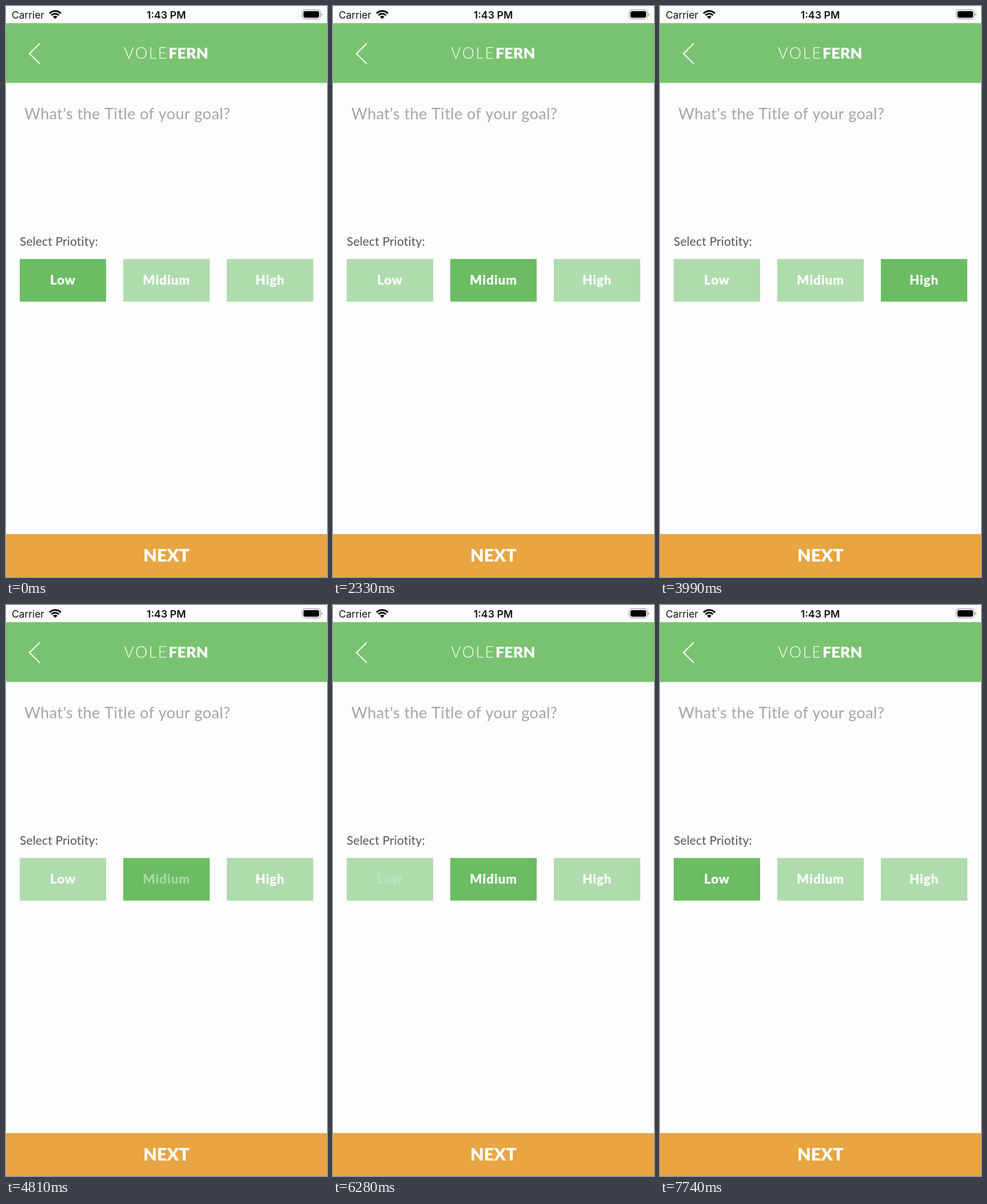
Write an HTML page with a canvas that moves like this. It is 561x998 px and loops after 7.84 s.

```html
<!DOCTYPE html>
<html lang="en">
<head>
<meta charset="utf-8">
<title>Goal form</title>
<style>
  html, body { margin: 0; width: 100%; height: 100%; overflow: hidden; background: #fdfdfc; }
  canvas { display: block; width: 561px; height: 998px; }
</style>
</head>
<body>
<canvas id="stage" width="561" height="998"></canvas>
<script>
const ctx = document.getElementById("stage").getContext("2d");
const LOOP = 7840;
const HOLD = 80;
const FADE = 1100;
const PRESSED_ALPHA = 0.2;

const buttons = [
  { label: "Low", x: 24 },
  { label: "Midium", x: 205 },
  { label: "High", x: 386 },
];
const taps = [
  { at: 980, button: 1 },
  { at: 2750, button: 2 },
  { at: 4440, button: 1 },
  { at: 6280, button: 0 },
];

function rect(x, y, w, h, color) {
  ctx.fillStyle = color;
  ctx.fillRect(x, y, w, h);
}

function text(str, x, y, font, color, { align = "left", spacing = 0 } = {}) {
  ctx.font = font;
  ctx.textAlign = align;
  ctx.letterSpacing = spacing + "px";
  ctx.fillStyle = color;
  ctx.fillText(str, x, y);
}

const lato = (weight, size) => `${weight} ${size}px Lato, sans-serif`;
const inter = (weight, size) => `${weight} ${size}px Inter, sans-serif`;

function drawWifi(x, y) {
  const up = -Math.PI / 2, spread = 0.8;
  ctx.strokeStyle = ctx.fillStyle = "#000";
  ctx.lineWidth = 3;
  for (const r of [13.8, 9]) {
    ctx.beginPath();
    ctx.arc(x, y, r, up - spread, up + spread);
    ctx.stroke();
  }
  ctx.beginPath();
  ctx.moveTo(x, y);
  ctx.arc(x, y, 5.5, up - spread, up + spread);
  ctx.fill();
}

function drawBattery() {
  ctx.strokeStyle = ctx.fillStyle = "#a0a0a0";
  ctx.lineWidth = 1.2;
  ctx.beginPath();
  ctx.roundRect(517.5, 6.7, 32, 16, 4.5);
  ctx.stroke();
  ctx.beginPath();
  ctx.arc(550.8, 14.7, 2.2, -Math.PI / 2, Math.PI / 2);
  ctx.fill();
  ctx.fillStyle = "#000";
  ctx.beginPath();
  ctx.roundRect(519.8, 9, 27.4, 11.4, 2.8);
  ctx.fill();
}

function drawStatusBar() {
  text("Carrier", 10, 21.5, inter(400, 17.4), "#111");
  drawWifi(86, 22.5);
  text("1:43 PM", 280, 21.5, inter(600, 17.8), "#111", { align: "center" });
  drawBattery();
}

function drawHeader() {
  rect(0, 30, 561, 104.5, "#79c370");
  ctx.strokeStyle = "#fff";
  ctx.lineWidth = 2;
  ctx.beginPath();
  ctx.moveTo(59, 65.5);
  ctx.lineTo(41, 83.3);
  ctx.lineTo(59, 101);
  ctx.stroke();
  text("VOLE", 206, 91.5, lato(300, 27), "#fff", { spacing: 2.4 });
  text("FERN", 284, 91.5, lato(900, 27), "#fff");
}

function stateAt(time) {
  const state = { selected: 0, active: -1, alpha: 1 };
  for (const tap of taps) {
    const age = time - tap.at;
    if (age < 0) break;
    state.active = tap.button;
    if (age >= HOLD) state.selected = tap.button;
    const progress = Math.min(1, Math.max(0, (age - HOLD) / FADE));
    state.alpha = PRESSED_ALPHA + (1 - PRESSED_ALPHA) * progress;
  }
  return state;
}

function drawButtons(time) {
  const { selected, active, alpha } = stateAt(time);
  buttons.forEach(({ label, x }, i) => {
    rect(x, 442.2, 151, 74.5, i === selected ? "#6bbc63" : "#aedcad");
    const opacity = i === active ? alpha : 1;
    text(label, x + 75.5, 487, lato(900, 22.4), `rgba(255,255,255,${opacity})`,
      { align: "center", spacing: 0.8 });
  });
}

function draw(now) {
  rect(0, 0, 561, 998, "#fdfdfc");
  drawStatusBar();
  drawHeader();
  text("What's the Title of your goal?", 32, 197.5, lato(400, 27), "#a5a5a8", { spacing: 0.4 });
  text("Select Priotity:", 24, 419, lato(400, 21), "#555551", { spacing: 0.15 });
  drawButtons(now % LOOP);
  rect(0, 923, 561, 75, "#e8a541");
  text("NEXT", 280.5, 970.5, lato(900, 30.5), "#fff", { align: "center" });
}

let start;
function tick(now) {
  start ??= now;
  draw(now - start);
  requestAnimationFrame(tick);
}
requestAnimationFrame(tick);
</script>
</body>
</html>
```
